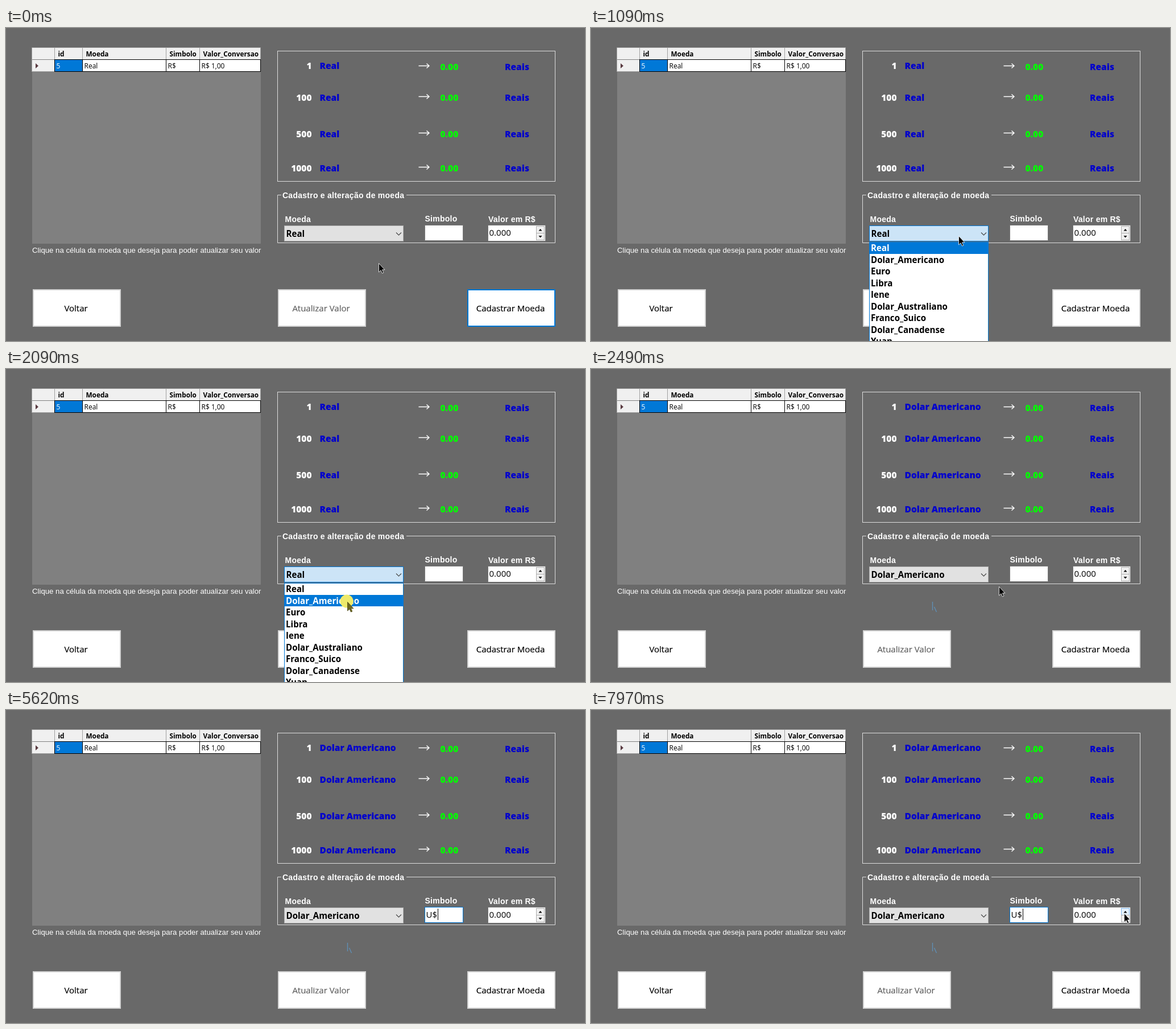
Write an HTML page that moves like this. It is 1018x550 px and loops after 8 s.

```html
<!DOCTYPE html>
<html lang="pt">
<head>
<meta charset="utf-8">
<title>Conversor de moedas</title>
<style>
html, body { margin: 0; width: 100%; height: 100%; overflow: hidden; background: #696969; }
svg { display: block; width: 1018px; height: 550px; }
text { white-space: pre; }
.ui { font: 15px "Open Sans", "Noto Sans", sans-serif; stroke-width: .2px; }
.bold { font: bold 15.1px "Open Sans", "Noto Sans", sans-serif; }
.black { font: 800 15.5px "Open Sans", "Noto Sans", sans-serif; }
.cell { font: 12px "Open Sans", "Noto Sans", sans-serif; }
.head { font: bold 11.8px "Open Sans", "Noto Sans", sans-serif; }
.hint { font: 13.2px "Liberation Sans", Arial, sans-serif; }
.label { font: bold 14px "Liberation Sans", Arial, sans-serif; letter-spacing: .25px; }
</style>
</head>
<body>
<svg id="stage" viewBox="0 0 1018 550"></svg>
<script>
const LOOP = 8000;
const BLUE = "#0078d7";
const stage = document.getElementById("stage");

function add(tag, attrs, parent = stage) {
  const el = document.createElementNS("http://www.w3.org/2000/svg", tag);
  set(el, attrs);
  parent.appendChild(el);
  return el;
}
function set(el, attrs) {
  for (const k in attrs) el.setAttribute(k, attrs[k]);
}
function rect(x, y, width, height, fill, parent) {
  return add("rect", { x, y, width, height, fill }, parent);
}
// Filled box with its border drawn inside the given bounds.
function box(x, y, w, h, fill, stroke, line = 1, parent) {
  const el = rect(x + line / 2, y + line / 2, w - line, h - line, fill, parent);
  set(el, { stroke, "stroke-width": line });
  return el;
}
function path(d, attrs, parent) {
  return add("path", { d, fill: "none", ...attrs }, parent);
}
function text(x, y, str, cls, fill, parent) {
  const el = add("text", { x, y, class: cls, fill }, parent);
  el.textContent = str;
  return el;
}
function show(el, on) {
  el.style.display = on ? "" : "none";
}

// Currency table
rect(46, 35, 402, 344, "#808080");
rect(46, 35, 402, 20, "#f0f0f0");
rect(46, 56, 39, 20, "#f0f0f0");
rect(85, 56, 362, 20, "#fff");
rect(85, 56, 49, 20, BLUE);
path("M45.5 77V34.5H448M46 76.5H85M85.5 35V55", { stroke: "#a0a0a0" });
path("M85 55.5H448M85 76.5H448M85.5 55V77", { stroke: "#000" });
const columns = [[85, 134, "id", "5"], [134, 281, "Moeda", "Real"],
  [281, 340, "Simbolo", "R$"], [340, 447, "Valor_Conversao", "R$ 1,00"]];
for (const [left, right, title, value] of columns) {
  rect(right, 35, 1, 20, "#a0a0a0");
  rect(right, 55, 1, 22, "#000");
  text(left + 6.5, 50, title, "head", "#000");
  text(left + 3.5, 71, value, "cell", title === "id" ? "#fff" : "#000");
}
path("M52 62L57 66.5L52 71Z", { fill: "#5a3a40" });
text(46, 395, "Clique na célula da moeda que deseja para poder atualizar seu valor", "hint", "#fff");

// Conversion panel
box(477, 40, 489, 230, "none", "#dcdcdc");
const names = [[1, 72], [100, 128], [500, 192], [1000, 252]].map(([amount, y]) => {
  const first = amount === 1;
  const mid = y - (first ? 5.5 : 7.5);
  set(text(537.5, y, amount, "black", "#fff"), { "text-anchor": "end" });
  path(`M725.5 ${mid}h18.5m-4.5 -4l4.5 4l-4.5 4`, { stroke: "#fff", "stroke-width": 1.4 });
  const base = first ? y + 2 : y;
  text(763.5, base, "0.00", "black", "#0f0");
  text(877, base, "Reais", "black", "#0000cd");
  return text(551.5, y, "Real", "black", "#0000cd");
});

// Form
path("M484 293.5H477.5V377.5H965.5V293.5H704", { stroke: "#dcdcdc" });
text(486, 299, "Cadastro e alteração de moeda", "label", "#fff");
text(490.5, 341, "Moeda", "label", "#fff");
text(736.5, 340, "Simbolo", "label", "#fff");
text(848, 341, "Valor em R$", "label", "#fff");

const combo = box(489, 347, 210, 28, "#e1e1e1", "#adadad");
const comboText = text(492.5, 367, "Real", "bold", "#000");
path("M686 359.5L690.5 364L695 359.5", { stroke: "#444", "stroke-width": 1.1 });

const symbolBox = box(736, 346, 68, 28, "#fff", "#7a7a7a");
const symbol = text(738.5, 365, "", "ui", "#000");
const caret = rect(739, 349, 1, 20, "#000");

box(847, 346, 102, 29, "#fff", "#7a7a7a");
text(849.5, 365, "0.000", "ui", "#000");
const spinUp = box(932, 348, 15, 13, "#f0f0f0", "#adadad");
box(932, 360, 15, 13, "#f0f0f0", "#adadad");
path("M936.5 356.5L939.5 353L942.5 356.5ZM936.5 365L939.5 368.5L942.5 365Z", { fill: "#000" });

// Buttons
function button(x, label, color) {
  const el = box(x, 459, 155, 66, "#fff", "#d2d2d2", 2);
  set(text(x + 76, 498, label, "ui", color), { "text-anchor": "middle", stroke: color });
  return el;
}
button(47, "Voltar", "#000");
button(478, "Atualizar Valor", "#606060");
const submit = button(811, "Cadastrar Moeda", "#000");

// Faint trace that stays after the list closes
const trace = path("M600.5 409V424M603.5 418L607.5 427", { stroke: "#5f8fb5", "stroke-width": 1.4 });

// Drop-down list
const ROW = 20.5, LIST_TOP = 376;
const items = ["Real", "Dolar_Americano", "Euro", "Libra", "Iene", "Dolar_Australiano",
  "Franco_Suico", "Dolar_Canadense", "Yuan", "Peso_Argentino", "Peso_Chileno",
  "Peso_Uruguaio", "Peso_Mexicano", "Peso_Colombiano", "Lira_Turca"];
const listHeight = items.length * ROW + 1;
rect(480, LIST_TOP, 240, 200, "#000", add("clipPath", { id: "below" }));
const popup = add("g", { "clip-path": "url(#below)" });
const list = add("g", {}, popup);
const shadow = rect(492, LIST_TOP + 3, 209, listHeight, "rgba(0,0,0,.5)", list);
const frame = box(489, LIST_TOP, 210, listHeight, "#fff", BLUE, 1, list);
const highlight = rect(490, LIST_TOP + 1, 208, 20, BLUE, list);
const rows = items.map((name, i) => text(492, 392.3 + i * ROW, name, "bold", "#000", list));

// Pointer
const halo = add("circle", { r: 11.5, fill: "#eeea6c" });
const arrow = path("M.5 .5V16L4 12.7L6.4 18L8.8 17L6.5 11.8H11Z", { "stroke-width": .8 });
const beam = path("M-3 -6.5H-1L0 -5.5L1 -6.5H3M0 -5.5V5.5M-3 6.5H-1L0 5.5L1 6.5H3", { stroke: "#000" });

// Pointer moves: start, end, destination
const moves = [
  [390, 900, 646, 365],
  [1290, 1640, 600, 409],
  [2160, 2490, 717, 382],
  [2490, 2820, 755, 357],
  [3040, 3170, 919, 369],
  [6540, 6750, 922, 380],
  [6750, 7300, 937, 357]
];
const keys = [[3170, ""], [4030, "U"], [5620, "U$"]];
const BLINK = 530;

const clamp = v => Math.min(1, Math.max(0, v));
const easeOut = v => 1 - (1 - v) ** 3;
const within = (t, a, b) => t >= a && t < b;
const stepped = t => Math.floor((t - 40) / 70) * 70 + 40;

function pointerAt(t) {
  let x = 655, y = 413;
  for (const [start, end, toX, toY] of moves) {
    const k = easeOut(clamp((t - start) / (end - start)));
    x += (toX - x) * k;
    y += (toY - y) * k;
  }
  return [Math.round(x), Math.round(y)];
}

function drawList(t) {
  const slide = clamp((stepped(t) - 874) / 200);
  const active = t >= 1360 ? 1 : 0;
  show(popup, within(t, 880, 2160));
  show(shadow, slide < 1);
  set(frame, { stroke: slide < 1 ? "#4a4a4a" : BLUE });
  set(list, { transform: `translate(0 ${(slide - 1) * listHeight})` });
  set(highlight, { y: Math.round(LIST_TOP + .5 + active * ROW) });
  rows.forEach((el, i) => set(el, { fill: i === active ? "#fff" : "#000" }));
}

function drawForm(t) {
  const chosen = t >= 2160;
  const pressed = within(t, 1020, 2160), hover = within(t, 740, 1020);
  set(combo, {
    fill: pressed ? "#cce4f7" : hover ? "#e5f1fb" : "#e1e1e1",
    stroke: pressed || hover ? BLUE : "#adadad"
  });
  comboText.textContent = chosen ? "Dolar_Americano" : "Real";
  names.forEach(el => el.textContent = chosen ? "Dolar Americano" : "Real");
  show(trace, chosen);

  set(submit, { stroke: t < 1020 ? BLUE : "#d2d2d2" });
  set(symbolBox, { stroke: t >= 2750 ? BLUE : "#7a7a7a" });
  const [since, typed] = keys.filter(([at]) => at <= t).pop() || [Infinity, ""];
  symbol.textContent = typed;
  set(caret, { x: Math.round(739 + (typed && symbol.getComputedTextLength())) });
  show(caret, t >= since && Math.floor((t - since) / BLINK) % 2 === 0);

  const spinHot = t >= 7230;
  set(spinUp, { fill: spinHot ? "#e5f1fb" : "#f0f0f0", stroke: spinHot ? "#7eb4ea" : "#adadad" });
}

function drawPointer(t) {
  const [x, y] = pointerAt(stepped(t));
  const click = within(t, 880, 1020) || within(t, 2030, 2160);
  const typing = within(t, 4100, 6540);
  const overField = within(t, 2820, 3040) || within(t, 3170, 6610);
  show(halo, click);
  set(halo, { cx: x - 1, cy: y - 1 });
  show(arrow, !overField);
  set(arrow, {
    transform: `translate(${x} ${y})`,
    fill: click ? "#6d6820" : "#000",
    stroke: click ? "#4a4614" : "#fff"
  });
  show(beam, overField && !typing);
  set(beam, { transform: `translate(${x - .5} ${y})` });
}

const start = performance.now();
function loop() {
  const t = (performance.now() - start) % LOOP;
  drawList(t);
  drawForm(t);
  drawPointer(t);
  requestAnimationFrame(loop);
}
loop();
</script>
</body>
</html>
```
